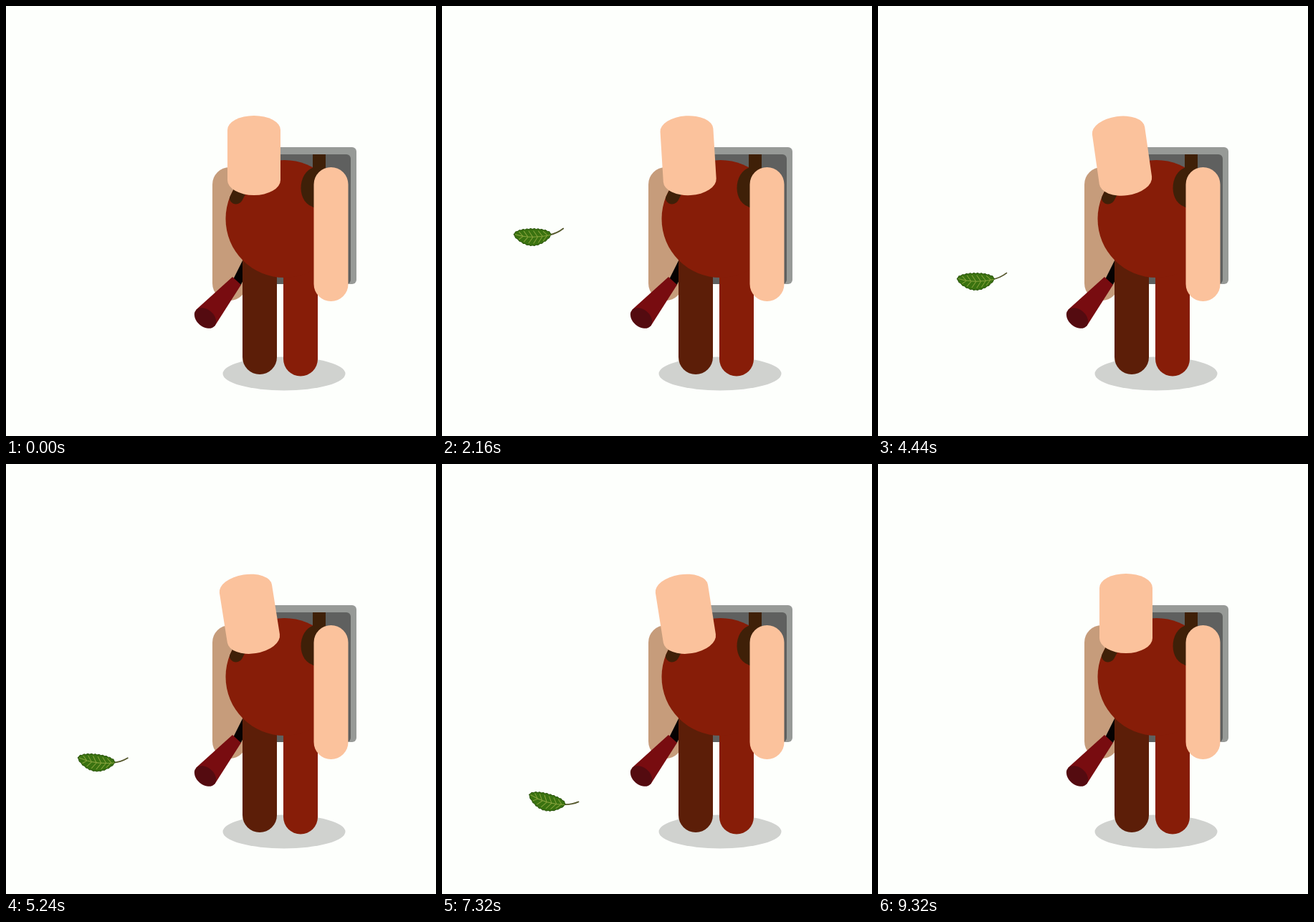
An HTML page with a canvas for the animation above (9.4 s loop, 600 px wide and 600 px high).

```html
<!DOCTYPE html>
<html lang="en">
<head>
<meta charset="utf-8">
<title>Falling leaf</title>
<style>
html, body { margin: 0; width: 100%; height: 100%; overflow: hidden; background: #fdfffc; }
canvas { display: block; width: 600px; height: 600px; }
</style>
</head>
<body>
<canvas id="stage" width="600" height="600"></canvas>
<script>
const g = document.getElementById('stage').getContext('2d');
const LOOP = 9400, RAD = Math.PI / 180;
const SKIN = '#fbc29c', SHADE = '#c69c7b', RED = '#871d08', STRAP = '#3f2008';

const clamp = u => Math.min(1, Math.max(0, u));
const smooth = u => u * u * (3 - 2 * u);
// Eased move by a given amount between two times
const move = (t, from, to, amount) => amount * smooth(clamp((t - from) / (to - from)));

function fill(color, draw) {
  g.fillStyle = color;
  g.beginPath();
  draw();
  g.fill();
}
const box = (color, x, y, w, h, r) => fill(color, () => g.roundRect(x, y, w, h, r));
const oval = (color, x, y, rx, ry, rot = 0) => fill(color, () => g.ellipse(x, y, rx, ry, rot, 0, 7));

function stroke(color, width, cap, draw) {
  g.strokeStyle = color;
  g.lineWidth = width;
  g.lineCap = cap;
  g.beginPath();
  draw();
  g.stroke();
}

function turned(x, y, deg, draw) {
  g.save();
  g.translate(x, y);
  g.rotate(deg * RAD);
  g.translate(-x, -y);
  draw();
  g.restore();
}

function blower() {
  stroke('#050202', 13, 'butt', () => { g.moveTo(322, 386); g.lineTo(345, 340); });
  fill('#780c10', () => {
    g.moveTo(265, 424);
    g.lineTo(316, 378);
    g.lineTo(328, 389);
    g.lineTo(291, 447);
  });
  oval('#540b10', 278, 435.5, 17, 12, 40 * RAD);
}

function leafShape() {
  const x = u => -25 + 52 * u;
  const midY = u => -3 + 4 * Math.sin(Math.PI * u);
  const half = u => 11.5 * Math.sin(Math.PI * u) ** 0.6;
  const outline = () => {
    for (const side of [-1, 1]) {
      for (let i = 0; i <= 20; i++) {
        const u = side < 0 ? i / 20 : 1 - i / 20;
        g.lineTo(x(u), midY(u) + side * (half(u) + (i % 2 ? 0.6 : -0.4)));
      }
    }
    g.closePath();
  };
  stroke('#55582c', 1.8, 'round', () => {
    g.moveTo(24, -2);
    g.quadraticCurveTo(35, -4, 44, -11);
  });
  fill('#3a7210', outline);
  stroke('#2c560d', 1, 'round', outline);
  stroke('#86a23c', 1, 'round', () => {
    g.moveTo(-23, -3);
    g.quadraticCurveTo(0, 4, 26, -2);
    for (let u = 0.25; u < 0.95; u += 0.13) {
      const tip = u - 0.11;
      for (const side of [-1, 1]) {
        g.moveTo(x(u), midY(u));
        g.lineTo(x(tip), midY(tip) + side * half(tip) * 0.75);
      }
    }
  });
}

function leaf(t) {
  // One loop in the air around a centre that drifts in, swings down and is blown away
  const heading = -14 - 360 * clamp((t - 2160) / 2260);
  const x = -130 + move(t, 1450, 2160, 244)
    + move(t, 3600, 3860, -20) + move(t, 3860, 4950, 55)
    + move(t, 4950, 5740, -115) + move(t, 5740, 6890, 100)
    + move(t, 7760, 8320, -226);
  const y = 277 + move(t, 3600, 4950, 91) + move(t, 4950, 6200, 23)
    + move(t, 6200, 7300, 35) + move(t, 7760, 8320, -3);
  const tilt = move(t, 4420, 5200, 7) + move(t, 6890, 7300, 8) + move(t, 7760, 8320, 37);
  g.save();
  g.translate(x - 46 * Math.sin(heading * RAD), y + 46 * Math.cos(heading * RAD));
  g.rotate((heading + 14 + tilt) * RAD);
  leafShape();
  g.restore();
}

function figure(t) {
  const lift = move(t, 7400, 7760, 1) + move(t, 8640, 9300, -1);
  const lean = move(t, 1000, 2100, -3.5) + move(t, 2100, 3600, -1.2)
    + move(t, 3600, 4780, -4.3) + move(t, 8640, 9300, 9);

  oval('#d0d2cf', 388, 513, 85.5, 23.5);
  box('#979a97', 330, 197, 159, 191, 6);
  box('#5f605f', 340, 207, 141, 181, 6);

  const bend = 24.5 * lift * RAD;
  stroke(SHADE, 48, 'round', () => {
    g.moveTo(312, 249);
    g.lineTo(312, 325);
    g.lineTo(312 - 62 * Math.sin(bend), 325 + 62 * Math.cos(bend));
  });
  turned(308, 338, 28.5 * lift, blower);

  box('#5c1e08', 330, 300, 48, 214, 24);
  box(RED, 387, 300, 48, 216.5, 24);
  oval(RED, 388.5, 297, 82, 82);
  g.save();
  g.beginPath();
  g.arc(388.5, 297, 82, 0, 7);
  g.clip();
  stroke(STRAP, 19, 'round', () => { g.moveTo(331, 248); g.lineTo(321, 267); });
  g.restore();
  box(STRAP, 428, 207, 18, 74, 0);
  fill(STRAP, () => {
    g.moveTo(430, 225);
    g.bezierCurveTo(405, 232, 405, 278, 432, 281);
  });
  box(SKIN, 429.5, 225, 48, 187, 24);

  turned(348, 247, lean, () => fill(SKIN, () => {
    g.ellipse(346, 173, 37, 20, 0, Math.PI, 0);
    g.ellipse(346, 243, 37, 21, 0, 0, Math.PI);
  }));
}

function frame(now) {
  const t = now % LOOP;
  g.fillStyle = '#fdfffc';
  g.fillRect(0, 0, 600, 600);
  figure(t);
  leaf(t);
  requestAnimationFrame(frame);
}
g.lineJoin = 'round';
requestAnimationFrame(frame);
</script>
</body>
</html>
```
